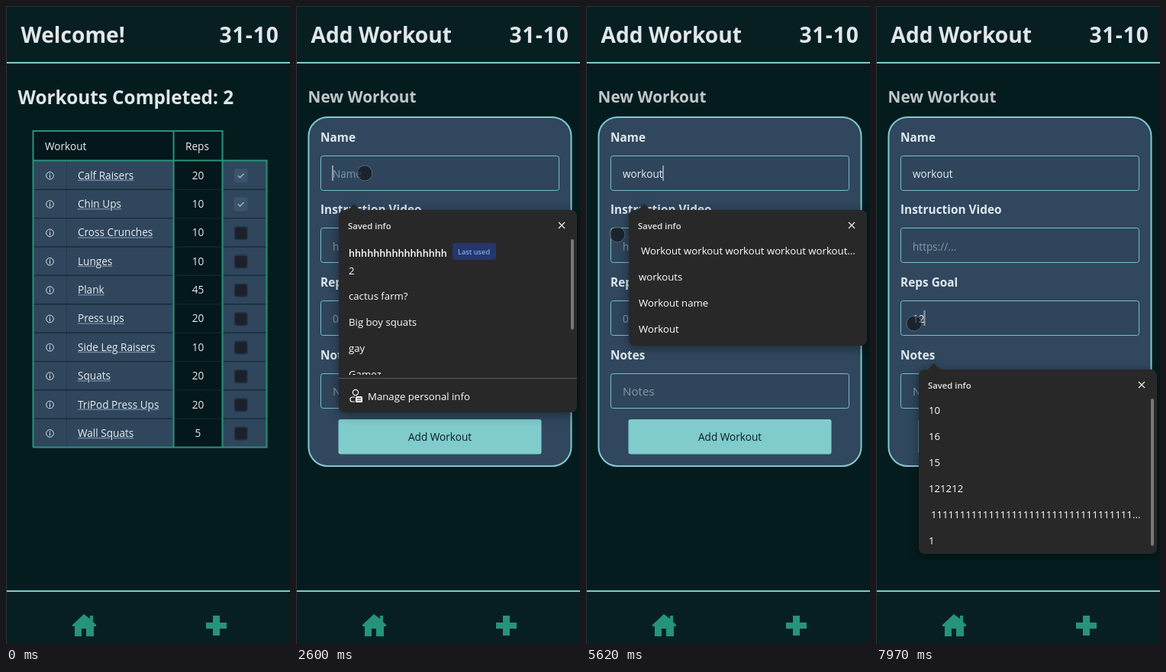
An HTML page for the animation above (8 s loop, 372 px wide and 832 px high).

```html
<!DOCTYPE html>
<html lang="en">
<head>
<meta charset="utf-8">
<title>Workout tracker</title>
<style>
html, body { margin: 0; width: 100%; height: 100%; overflow: hidden; background: #051c1e; }
svg { display: block; width: 100vw; height: 100vh; }
text { font: 13.6px "Open Sans", "Noto Sans", sans-serif; fill: #e9eef1; white-space: pre; }
.title { font-size: 28.2px; font-weight: 700; fill: #e1e7e9; }
.date { letter-spacing: 1px; }
.h2 { font-size: 24.3px; font-weight: 700; fill: #dfe6e8; }
.h3 { font-size: 20.8px; font-weight: 700; fill: #bfc7c9; }
.label { font-size: 15.4px; font-weight: 700; fill: #dfe8ee; }
.hint { fill: #8799a9; }
.big { font-size: 15.2px; }
.mid { text-anchor: middle; }
.link { text-decoration: underline; fill: #7389a0; }
.link tspan { fill: #e9eef1; }
.teal { stroke: #26937b; stroke-width: 2; fill: none; }
.slate { fill: #2f465c; }
.field { fill: #2e455b; stroke: #76c0c5; }
.pop { filter: drop-shadow(0 3px 7px rgba(0, 0, 0, .4)); transform-box: fill-box; transform-origin: center; }
.pop text { font-size: 13.2px; fill: #fff; }
.pop .head { font-size: 11.3px; font-weight: 600; fill: #e4e4e4; }
.pop .bold { font-size: 12.7px; font-weight: 600; }
.pop .badge { font-size: 9.2px; font-weight: 600; fill: #7fa9f5; }

#dot { animation: path 8s linear infinite, dot 8s step-end infinite; }
#caret { animation: caret 8s step-end infinite; }
#nameList { animation: nameList 8s linear infinite; }
#linkList { animation: linkList 8s linear infinite; }

@keyframes dot {
  0% { visibility: hidden; } 4.81% { visibility: visible; }
  18.19% { visibility: hidden; } 25.69%, 100% { visibility: visible; }
}
@keyframes path {
  0%, 4.81% { transform: translate(147px, 826px); }
  7.4% { transform: translate(235px, 803px); }
  9.875%, 11.69% { transform: translate(316px, 810px); }
  12.44% { transform: translate(278px, 809px); }
  25.7% { transform: translate(278px, 809px); animation-timing-function: ease-in-out; }
  30%, 61.7% { transform: translate(90px, 218px); }
  61.94% { transform: translate(48px, 184.5px); }
  62.7% { transform: translate(11px, 195.5px); }
  64.4% { transform: translate(11px, 195.5px); animation-timing-function: ease-in-out; }
  70%, 83.7% { transform: translate(41px, 298px); }
  85.3% { transform: translate(33px, 352px); }
  87%, 100% { transform: translate(50px, 414px); }
}
@keyframes caret {
  0% { opacity: 0; transform: translate(48px, 208px); }
  32.375% { opacity: 1; transform: translate(48px, 208px); }
  39.2% { opacity: 0; transform: translate(48px, 208px); }
  46.1% { opacity: 1; transform: translate(48px, 208px); }
  49.31% { opacity: 1; transform: translate(59px, 208px); }
  50.06% { opacity: 1; transform: translate(67px, 208px); }
  51.81% { opacity: 1; transform: translate(72.5px, 208px); }
  52.56% { opacity: 1; transform: translate(79.5px, 208px); }
  54.31% { opacity: 1; transform: translate(88px, 208px); }
  55.13% { opacity: 1; transform: translate(96px, 208px); }
  55.94% { opacity: 1; transform: translate(101px, 208px); }
  62.7% { opacity: 0; transform: translate(101px, 208px); }
  69.2% { opacity: 1; transform: translate(101px, 208px); }
  73.6% { opacity: 1; transform: translate(48px, 303px); }
  80.45% { opacity: 0; transform: translate(48px, 303px); }
  87.25% { opacity: 1; transform: translate(48px, 303px); }
  89.3% { opacity: 1; transform: translate(48px, 397px); }
  96.3% { opacity: 0; transform: translate(48px, 397px); }
  97.06% { opacity: 1; transform: translate(56px, 397px); }
  99.56%, 100% { opacity: 1; transform: translate(63.5px, 397px); }
}
@keyframes nameList {
  0%, 51.8% { opacity: 0; transform: scale(1); }
  51.81%, 73.6% { opacity: 1; transform: scale(1); }
  74.5% { opacity: .5; transform: scale(.972); }
  76.06%, 100% { opacity: 0; transform: scale(.94); }
}
@keyframes linkList {
  0%, 74.36% { opacity: 0; transform: scale(1); }
  74.37%, 89.44% { opacity: 1; transform: scale(1); }
  90.44% { opacity: .5; transform: scale(.972); }
  91.875%, 100% { opacity: 0; transform: scale(.94); }
}
</style>
</head>
<body>
<svg id="stage" viewBox="0 0 372 832"></svg>
<script>
const LOOP = 8000;
const text = (x, y, s, cls = '') => `<text x="${x}" y="${y}" class="${cls}">${s}</text>`;
const rect = (x, y, w, h, attrs) => `<rect x="${x}" y="${y}" width="${w}" height="${h}" ${attrs}/>`;
const path = (d, attrs) => `<path d="${d}" ${attrs}/>`;
// Shows its content only between two times of the loop
const during = (from, to, body) => `<g data-t="${from} ${to}">${body}</g>`;

const chrome =
  rect(0, 0, 372, 832, 'fill="#051c1e"') +
  rect(0, 0, 372, 73, 'fill="#081f22"') +
  rect(0, 764, 372, 68, 'fill="#081f22"') +
  rect(0, 73, 372, 2, 'fill="#80c9ce"') +
  rect(0, 762, 372, 2, 'fill="#80c9ce"') +
  path('M0 .5H372M.5 0V832', 'stroke="#2b3336"') +
  path('M102 793L87 807V809H90V822H99V812H105V822H115V809H118V807L114 803V795H110V799Z', 'fill="#26937b"') +
  path('M271 795H280V804H289V812H280V821H271V812H262V804H271Z', 'fill="#26937b"') +
  text(279.5, 48, '31-10', 'title date');

// Home page
const workouts = [['Calf Raisers', 20], ['Chin Ups', 10], ['Cross Crunches', 10], ['Lunges', 10],
  ['Plank', 45], ['Press ups', 20], ['Side Leg Raisers', 10], ['Squats', 20],
  ['TriPod Press Ups', 20], ['Wall Squats', 5]];
const ROW = 37.35;

function workoutRow([name, reps], i) {
  const y = 220.7 + i * ROW, line = y + ROW / 2;
  const box = i < 2
    ? rect(298.5, y - 8.5, 18, 18, 'rx="3" fill="#3b546c"') +
      path(`M304 ${y + .5}l2.5 2.5 5-5`, 'fill="none" stroke="#8cbbd6" stroke-width="1.5"')
    : rect(299.5, y - 7.5, 16.5, 16.5, 'rx="3" fill="#1b202a" stroke="#253342" stroke-width="1.5"');
  return `<circle cx="57.5" cy="${y + .5}" r="4.8" fill="none" stroke="#dfe6ea"/>` +
    path(`M57.5 ${y - .5}v4M57.5 ${y - 2.5}v1.2`, 'stroke="#dfe6ea" stroke-width="1.1"') +
    text(94, y + 5, `<tspan>${name}</tspan>`, 'link') + text(251.5, y + 5, reps, 'mid') + box +
    (i < 9 ? path(`M36 ${line}H341`, 'stroke="#14262f" stroke-width="1.2"') : '');
}

const home = text(19.5, 48, 'Welcome!', 'title') +
  text(15.5, 128, 'Workouts Completed: 2', 'h2') +
  rect(36, 202, 183, 373, 'class="slate"') + rect(284, 202, 57, 373, 'class="slate"') +
  rect(221, 164, 62, 411, 'fill="#04171a"') + rect(36, 164, 183, 37, 'fill="#04171a"') +
  path('M79.5 202V575', 'stroke="#283b4d"') +
  text(51, 188, 'Workout') + text(250.5, 188, 'Reps', 'mid') +
  workouts.map(workoutRow).join('') +
  path('M35.5 575.5V163H283.5V575.5M219.5 163V575.5M35.5 201.5H341.5V575.5H35.5', 'class="teal"');

// Form page
const field = (y, label) => text(32, y - 18, label, 'label') +
  rect(32.5, y + .5, 312, 45, 'rx="3" class="field"');

const typed = (x, y, word, times) =>
  `<text x="${x}" y="${y}">` +
  [...word].map((c, i) => `<tspan data-t="${times[i]} ${LOOP}">${c}</tspan>`).join('') + '</text>';

const form = text(19.5, 48, 'Add Workout', 'title') +
  text(15.5, 125.5, 'New Workout', 'h3') +
  rect(16.5, 145, 344, 455, 'rx="25" fill="#30475e" stroke="#80cacf" stroke-width="2"') +
  field(195, 'Name') + field(289, 'Instruction Video') +
  field(384, 'Reps Goal') + field(479, 'Notes') +
  during(1855, 3945, text(48, 223.5, 'Name', 'hint')) +
  typed(48, 223.5, 'workout', [3945, 4005, 4145, 4205, 4345, 4410, 4475]) +
  text(48, 318.5, 'https://...', 'hint') +
  during(1855, 7765, text(48, 413, '0', 'hint')) +
  typed(48, 413, '12', [7765, 7965]) +
  text(48, 508, 'Notes', 'hint big') +
  rect(55.5, 539, 266, 45.5, 'rx="3" fill="#80cbcb"') +
  `<text x="188.5" y="566.5" class="mid" style="fill:#0a1f24">Add Workout</text>`;

// Autofill list; a row is [text, x]
const bar = (y, h) => rect(360, y, 4, h, 'rx="2" fill="#777"');
const popup = (id, y, h, body) => `<g class="pop" id="${id}">` +
  path(`M67 ${y + 1}L76 ${y - 8}L85 ${y + 1}Z`, 'fill="#282828"') +
  rect(56, y, 312, h, 'rx="8" fill="#282828"') +
  text(68, y + 24.5, 'Saved info', 'head') +
  path(`M344 ${y + 16}l8 8m0-8l-8 8`, 'stroke="#eee" stroke-width="1.2"') + body + '</g>';
const rows = (y, list) => list.map(([s, x = 69], i) => text(x, y + 57.5 + i * 34, s)).join('');

const savedNames = popup('saved', 266, 264,
  text(69, 326.5, 'h'.repeat(16), 'bold') +
  rect(205, 309, 57, 22, 'rx="4" fill="#25376a"') + text(212, 323.5, 'Last used', 'badge') +
  text(69, 350, '2') +
  ['cactus farm?', 'Big boy squats', 'gay', 'Gamez'].map((s, i) => text(69, 382.5 + i * 34, s)).join('') +
  bar(304, 118) +
  rect(56, 481, 312, 49, 'rx="8" fill="#282828"') +
  path('M56 485.5H368', 'stroke="#5a5a5a"') +
  '<g fill="none" stroke="#fff" stroke-width="1.2"><circle cx="78" cy="504" r="3.6"/>' +
  path('M77 516H73Q71 516 71 513Q71 510 74 510H77', '') + '</g>' +
  rect(78, 509, 9, 8, 'rx="1.5" fill="#fff"') +
  path('M80 511.5H85M80 514H85', 'stroke="#282828"') +
  text(94, 513.5, 'Manage personal info'));

const wordRows = [['Workout workout workout workout workout...', 72], ['workouts'], ['Workout name'], ['Workout']];
const url = id => 'https://www.youtube.com/watch?' + id + '...';
const links = [[url('v=0Ul6Rt'), 71], [url('v=dQw4'), 74], ['None'],
  [url('v=Z1IM_'), 73], [url('k=0Ul6Rt'), 71], [url('v=dQw4'), 74]];
const ones = ['1'.repeat(35) + '...', 72];
const repList = list => popup('reps', 474, 240.5, rows(474, list) + bar(512, 192));

document.getElementById('stage').innerHTML = chrome +
  during(0, 1855, home) +
  during(1855, LOOP, form) +
  '<rect id="caret" x="-.5" width="1" height="20" fill="#f2f5f7"/>' +
  '<circle id="dot" r="10" fill="rgba(14,16,20,.62)" stroke="rgba(140,140,140,.55)"/>' +
  during(1455, 2055, path('M277.5 807L279.5 830L285 822.5L293.5 821Z',
    'fill="#cbc3f4" stroke="#9a90d6" stroke-linejoin="round"')) +
  during(2590, 3945, savedNames) +
  during(3945, 4145, popup('short', 266, 211, rows(266, [...wordRows, ['wow']]))) +
  during(7220, 7765, repList([['20'], ['10'], ['16'], ['15'], ['121212'], ones])) +
  during(7765, LOOP, repList([['10'], ['16'], ['15'], ['121212'], ones, ['1']])) +
  popup('linkList', 370, 240.5, rows(370, links) + bar(408, 192)) +
  popup('nameList', 266, 177, rows(266, wordRows));

// Turn every time window into a stepped keyframe rule
let css = '';
document.querySelectorAll('[data-t]').forEach((el, i) => {
  const [from, to] = el.dataset.t.split(' ').map(t => t / LOOP * 100);
  css += `@keyframes w${i} { 0% { visibility: hidden } ${from}% { visibility: visible }` +
    (to < 100 ? ` ${to}%, 100% { visibility: hidden }` : ' 100% { visibility: visible }') + ' }\n';
  el.style.animation = `w${i} ${LOOP}ms step-end infinite`;
});
document.head.appendChild(document.createElement('style')).textContent = css;
</script>
</body>
</html>
```
